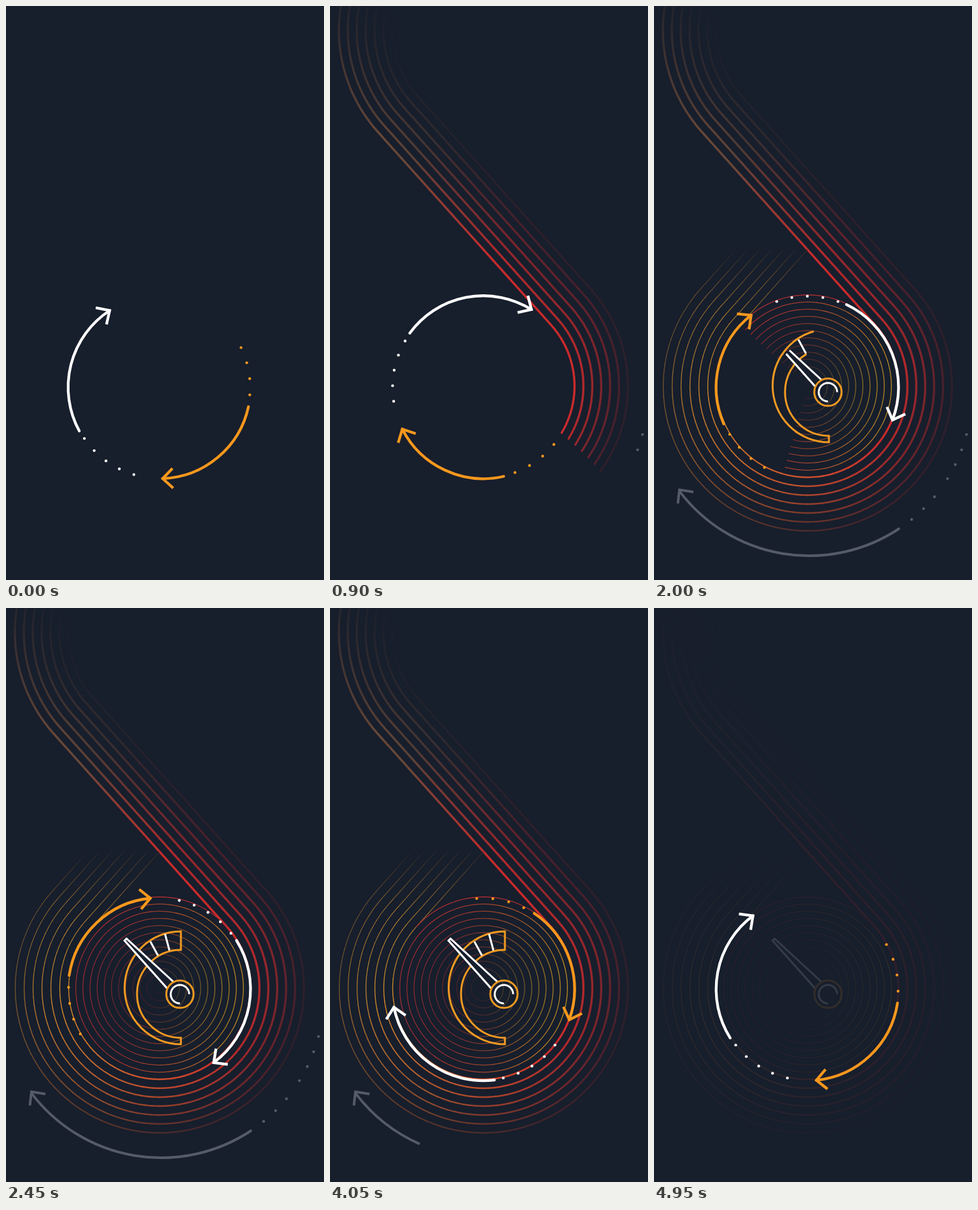
Write an HTML page with a canvas that moves like this. It is 500 px wide and 900 px high and loops after 5000 ms.

```html
<!DOCTYPE html>
<html lang="en">
<head>
<meta charset="utf-8">
<style>
  html, body { margin: 0; width: 100%; height: 100%; overflow: hidden; background: #171e2c; }
  canvas { display: block; }
</style>
</head>
<body>
<canvas id="stage" width="500" height="900"></canvas>
<script>
const ctx = document.getElementById('stage').getContext('2d');
const LOOP = 5000, TAU = Math.PI * 2, RAD = Math.PI / 180;
const BG = [23, 30, 44], BROWN = [104, 72, 56], RED = [202, 43, 44], AMBER = [210, 146, 46], YELLOW = [218, 162, 35];
const BG_CSS = '#171e2c', ORANGE = '#f7981d', WHITE = '#fff', GREY = '#555c67';
const CX = 241.5, CY = 596;       // centre of the rings
const TILT = 41.9 * RAD;          // angle where the straight lines touch the rings
const COS = Math.cos(TILT), SIN = Math.sin(TILT);
const TAIL_TOP = 382;             // height where the thin lines on the left end

const clamp = x => Math.max(0, Math.min(1, x));
const ramp = (t, a, b) => clamp((t - a) / (b - a));
const mix = (a, b, f) => a + (b - a) * f;
const mixAll = (a, b, f) => a.map((v, i) => mix(v, b[i], f));
const css = (rgb, alpha) => `rgb(${mixAll(BG, rgb, alpha).map(Math.round)})`;
const polar = (x, y, r, a) => [x + r * Math.cos(a), y + r * Math.sin(a)];

function stroke(points, color, width) {
  ctx.beginPath();
  points.forEach(p => ctx.lineTo(...p));
  ctx.strokeStyle = color;
  ctx.lineWidth = width;
  ctx.stroke();
}

function arc(x, y, r, from, to, color, width, cap = 'butt') {
  ctx.beginPath();
  ctx.arc(x, y, r, from, to);
  ctx.strokeStyle = color;
  ctx.lineWidth = width;
  ctx.lineCap = cap;
  ctx.stroke();
  ctx.lineCap = 'butt';
}

function dot(p, color) {
  ctx.fillStyle = color;
  ctx.beginPath();
  ctx.arc(...p, 2.2, 0, TAU);
  ctx.fill();
}

// Strokes the part from a to b (0..1) of a path of the given length
function trim(path, length, a, b, color) {
  if (b <= a) return;
  ctx.setLineDash([0, a * length, (b - a) * length, 9999]);
  ctx.strokeStyle = color;
  ctx.lineWidth = 3;
  ctx.stroke(path);
  ctx.setLineDash([]);
}

// Band of seven lines; position u: bend 0-1, diagonal 1-2, ring 2-3, tail 3-4
const radius = i => 143 + 14 * i;
const tailRise = i => CY - SIN * radius(i) - TAIL_TOP;

function bandPoint(i, u) {
  const r = radius(i);
  const bend = f => polar(252, 38, 381 - r, mix(192 * RAD, Math.PI - TILT, f));
  const ring = f => polar(CX, CY, r, mix(-TILT, Math.PI + TILT, f));
  if (u < 1) return bend(u);
  if (u < 2) return mixAll(bend(1), ring(0), u - 1);
  if (u < 3) return ring(u - 2);
  const [x, y] = ring(1), rise = tailRise(i) * (u - 3);
  return [x + rise * SIN / COS, y - rise];
}

// The tip runs at constant speed through the four pieces
function bandFront(i, t) {
  let left = 0.892 * t;
  return [212 - 2 * i, 408, 658, tailRise(i) / COS].reduce((u, length) => {
    const f = clamp(left / length);
    left -= length;
    return u + f;
  }, 0);
}

function drawBand(t) {
  const step = 1 / 80;
  for (let i = 6; i >= 0; i--) {
    const end = bandFront(i, t);
    for (let u = 0; u < end; u += step) {
      const warm = mixAll(BROWN, RED, ramp(u, 1.15, 1.65));
      const color = mixAll(warm, AMBER, ramp(u, 2.3, 2.85));
      const fade = mix(0.15, 1, ramp(u, 0, 1)) * mix(1, 0.1, ramp(u, 2.8, 4));
      const depth = mix(1 - 0.147 * i, 1 - 0.014 * i * i, ramp(u, 2.25, 2.8));
      const width = mix(3.4, 1.1, ramp(u, 2.2, 2.9));
      const next = Math.min(u + step * 1.1, end);
      stroke([bandPoint(i, u), bandPoint(i, next)], css(color, fade * depth), width);
    }
  }
}

// Concentric rings: red on the left, yellow on the right, darker inwards
function drawRings(t) {
  const start = Math.PI + TILT, sweep = TAU * ramp(t, 1580, 2200), step = TAU / 60;
  for (let k = 0; k < 13; k++) {
    const span = k ? sweep : Math.min(sweep, Math.PI - 2 * TILT);
    const alpha = 0.92 * (1 - k / 13.5);
    for (let a = 0; a < span; a += step) {
      const from = start + a, to = start + Math.min(a + step * 1.05, span);
      const glow = k ? ((1 + Math.cos(from)) / 2) ** 2 : 0;
      arc(CX, CY, 143 - 11.2 * k, from, to, css(mixAll([180, 47, 50], YELLOW, glow), alpha), 1.3);
    }
  }
}

const HUB = [273.5, 605.5];
const gaugeOuter = new Path2D('M275 672.5V684A88.5 88.5 0 0 1 275 507V537.5');
const gaugeInner = new Path2D('M275 674A69 69 0 0 1 275 536');
const hubRing = new Path2D(), hubArc = new Path2D();
hubRing.arc(...HUB, 21.5, 0, TAU);
hubArc.arc(...HUB, 14.5, Math.PI / 2, TAU);

function drawGauge(t) {
  const gone = ramp(t, 4300, 4800), shown = ramp(t, 1520, 2100);
  trim(gaugeOuter, 320, gone, shown, '#f29a22');
  trim(gaugeInner, 217, gone, shown, '#f29a22');
  [[[227, 523], [239, 545]], [[250, 511], [257, 537]]].forEach((tick, i) => {
    if (t > 1980 + 80 * i && t < 4600 + 80 * i) stroke(tick, WHITE, 3);
  });

  // The needle grows out of the hub
  const reach = mix(21, 130, ramp(t, 1750, 2150));
  if (reach > 21) {
    ctx.save();
    ctx.beginPath();
    ctx.arc(...HUB, reach, 0, TAU);
    ctx.clip();
    stroke([[254, 597], [186.5, 521.5], [189.5, 518.5], [263, 586]], WHITE, 3);
    ctx.fillStyle = BG_CSS;
    ctx.fill();
    ctx.stroke();
    ctx.restore();
  }
  trim(hubRing, TAU * 21.5, 0, ramp(t, 1480, 1800), '#f29a22');
  trim(hubArc, TAU * 14.5 * 0.75, 0, ramp(t, 1620, 1900), WHITE);
}

// Grey outer arrow: drawn on, later wiped off at the same speed
function drawGrey(t) {
  const x = 244, y = 606, r = 256, first = 56.6, last = 142.5;
  const sweep = time => 139 + (time - 1550) * 0.178;
  const head = sweep(t), tail = sweep(t - 2642);
  for (let k = 0; k < 7; k++) {
    const a = 14.9 + 5.65 * k + (k > 3 ? 2.2 : 0);
    if (a + 1 < head && a > tail) dot(polar(x, y, r, a * RAD), GREY);
  }
  const from = Math.max(first, tail), to = Math.min(last, head);
  if (to > from) arc(x, y, r, from * RAD, to * RAD, GREY, 4, from > first ? 'butt' : 'round');
  if (head > last && tail < last) stroke([[37.5, 780], [40, 758.5], [62, 762]], GREY, 4);
}

// Orbiting arrow with a dotted trail
function drawArrow(tail, span, dots, gap, spacing, color) {
  const x = 241.1, y = 597.7, r = 143.4;
  const tip = (tail + span) * RAD;
  const barb = out => {
    const [px, py] = polar(x, y, r + out, tip);
    return [px + 16 * Math.sin(tip), py - 16 * Math.cos(tip)];
  };
  arc(x, y, r, tail * RAD, tip, color, 4.3, 'round');
  stroke([barb(15.5), polar(x, y, r, tip), barb(-15.5)], color, 4.3);
  for (let k = 0; k < dots; k++) dot(polar(x, y, 142.7, (tail - gap - spacing * k) * RAD), color);
}

function draw(t) {
  ctx.fillStyle = BG_CSS;
  ctx.fillRect(0, 0, 500, 900);
  if (t > 0) {
    drawBand(t);
    drawRings(t);
    drawGauge(t);
    drawGrey(t);
    ctx.globalAlpha = ramp(t, 4600, LOOP);
    ctx.fillStyle = BG_CSS;
    ctx.fillRect(0, 0, 500, 900);
    ctx.globalAlpha = 1;
  }
  const turn = 360 * t / LOOP;
  drawArrow(151.4 + turn, 85.6, 5, 5.7, 9.85, WHITE);
  drawArrow(12.3 + turn, 75.6, 4, 7.5, 10.2, ORANGE);
}

let start;
function frame(now) {
  start ??= now;
  draw((now - start) % LOOP);
  requestAnimationFrame(frame);
}
requestAnimationFrame(frame);
</script>
</body>
</html>
```
